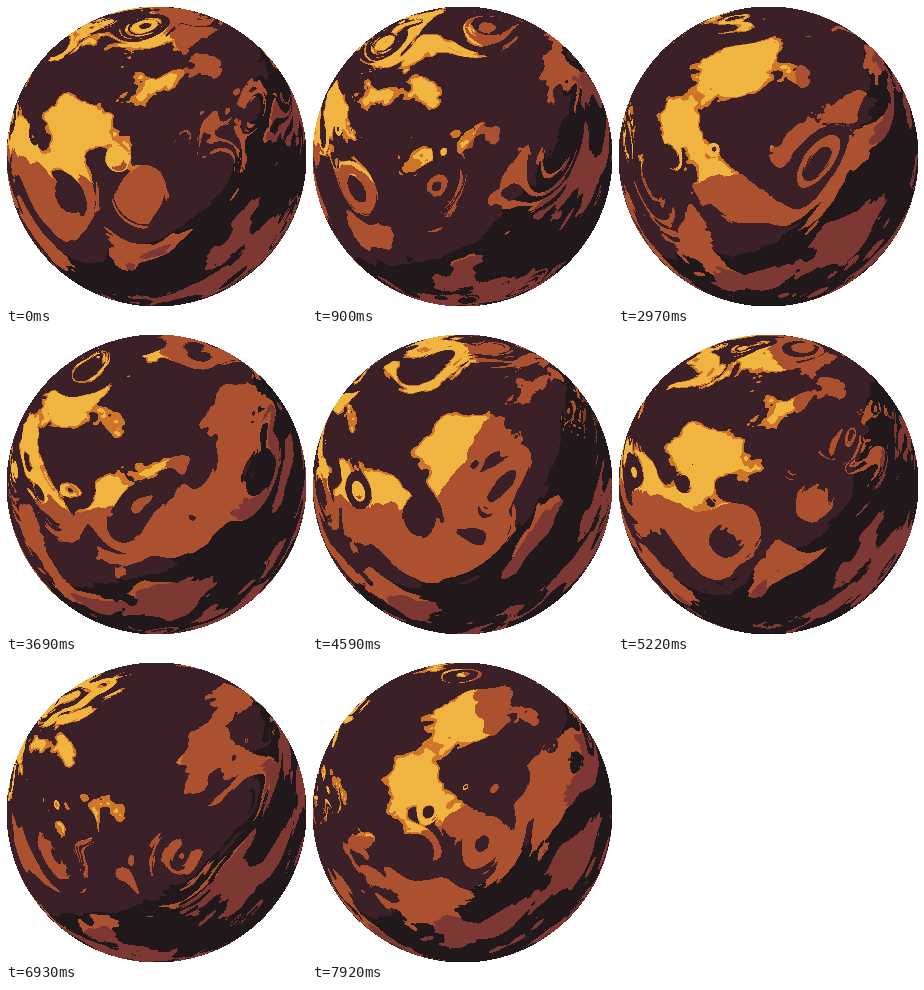
An HTML page with a canvas that plays this animation: 300 by 300 pixels, repeating every 8 s.

```html
<!DOCTYPE html>
<html lang="en">
<head>
<meta charset="utf-8">
<title>Gas planet</title>
<style>
  html, body { margin: 0; width: 100%; height: 100%; overflow: hidden; background: #fff; }
  canvas { display: block; width: 100%; height: 100%; image-rendering: pixelated; }
</style>
</head>
<body>
<canvas width="300" height="300"></canvas>
<script>
const SIZE = 300;
const LOOP_MS = 8000, STEP_MS = 90;
const DRIFT = 0.15;            // noise units per step
const PERIOD = 9, SEED = 8.81, OCTAVES = 5, CIRCLE_LAYERS = 9;
const LIGHT = 0.25, CLOUD_COVER = 0.468;

// Little-endian RGBA pixel from a hex colour.
const pixel = hex => {
  const n = parseInt(hex, 16);
  return (0xff000000 | (n & 255) << 16 | (n & 0xff00) | n >> 16) >>> 0;
};
const GROUND = pixel('3b2027'), GROUND_SHADE = pixel('21181b');
const CLOUD = pixel('f0b541'), CLOUD_RIM = pixel('cf752b');
const CLOUD_SHADE = pixel('ab5130'), CLOUD_DARK = pixel('7d3833');

const ease = t => t * t * (3 - 2 * t);
const mix = (a, b, t) => a + (b - a) * t;

// Periodic lattice of pseudo-random values.
const lattice = Float64Array.from({ length: PERIOD * PERIOD }, (_, k) => {
  const x = k % PERIOD, y = Math.floor(k / PERIOD);
  const v = Math.sin(x * 12.9898 + y * 78.233) * 15.5453 * SEED;
  return v - Math.floor(v);
});
const rand = (x, y) => lattice[(y % PERIOD) * PERIOD + x % PERIOD];

function noise(x, y) {
  const ix = Math.floor(x), iy = Math.floor(y);
  const tx = ease(x - ix), ty = ease(y - iy);
  return mix(
    mix(rand(ix, iy), rand(ix + 1, iy), tx),
    mix(rand(ix, iy + 1), rand(ix + 1, iy + 1), tx), ty);
}

function fbm(x, y) {
  let value = 0, scale = 0.5;
  for (let i = 0; i < OCTAVES; i++) {
    value += noise(x, y) * scale;
    x *= 2;
    y *= 2;
    scale *= 0.5;
  }
  return value;
}

// Sum of round dents that twist the clouds into storms.
function storms(x, y) {
  const row = Math.floor(y), fy = y - row;
  if (fy < 0.25) return CIRCLE_LAYERS;   // no dent reaches this strip
  let sum = 0;
  for (let i = 0; i < CIRCLE_LAYERS; i++) {
    const shift = i + 11;
    const cx = x + shift + (row + shift) * 0.31;
    const column = Math.floor(cx);
    const h = rand(column, row + shift);
    const center = 0.25 + h * 0.5;
    const dx = cx - column - center, dy = fy - center;
    sum += ease(Math.min(1, 3 * Math.sqrt(dx * dx + dy * dy) / h));
  }
  return sum;
}

// Sphere projection of every visible pixel, computed once.
const points = [];
for (let py = 0; py < SIZE; py++) {
  for (let px = 0; px < SIZE; px++) {
    const u = px / SIZE, v = py / SIZE;
    if (Math.hypot(u - 0.5, v - 0.5) > 0.49999) continue;
    const x = u * 2 - 1, y = v * 2 - 1;
    const z = Math.sqrt(1 - x * x - y * y);
    const sx = x / (z + 1) * 0.5 + 0.5;
    const bend = ease(Math.min(1, Math.abs(sx - 0.4) / 1.3));
    const sy = y / (z + 1) * 0.5 + 0.5 + bend;
    points.push({ index: py * SIZE + px, sx, sy, light: Math.hypot(u - LIGHT, v - LIGHT) });
  }
}

function shade(density, light) {
  const depth = light + density * 0.2;
  if (density < CLOUD_COVER) return depth > 0.666 ? GROUND_SHADE : GROUND;
  if (depth > 0.746) return CLOUD_DARK;
  if (depth > 0.439) return CLOUD_SHADE;
  return density < CLOUD_COVER + 0.03 ? CLOUD_RIM : CLOUD;
}

const ctx = document.querySelector('canvas').getContext('2d');
const image = ctx.createImageData(SIZE, SIZE);
const pixels = new Uint32Array(image.data.buffer);

function draw(step) {
  const drift = step * DRIFT;
  for (const { index, sx, sy, light } of points) {
    const warp = storms(sx * PERIOD * 0.3 + drift, sy * PERIOD * 0.3);
    const density = fbm(sx * PERIOD + warp + drift, sy * PERIOD + warp);
    pixels[index] = shade(density, light);
  }
  ctx.putImageData(image, 0, 0);
}

let shown = -1;
function tick() {
  const step = Math.floor(performance.now() % LOOP_MS / STEP_MS);
  if (step !== shown) draw(shown = step);
  requestAnimationFrame(tick);
}
tick();
</script>
</body>
</html>
```
